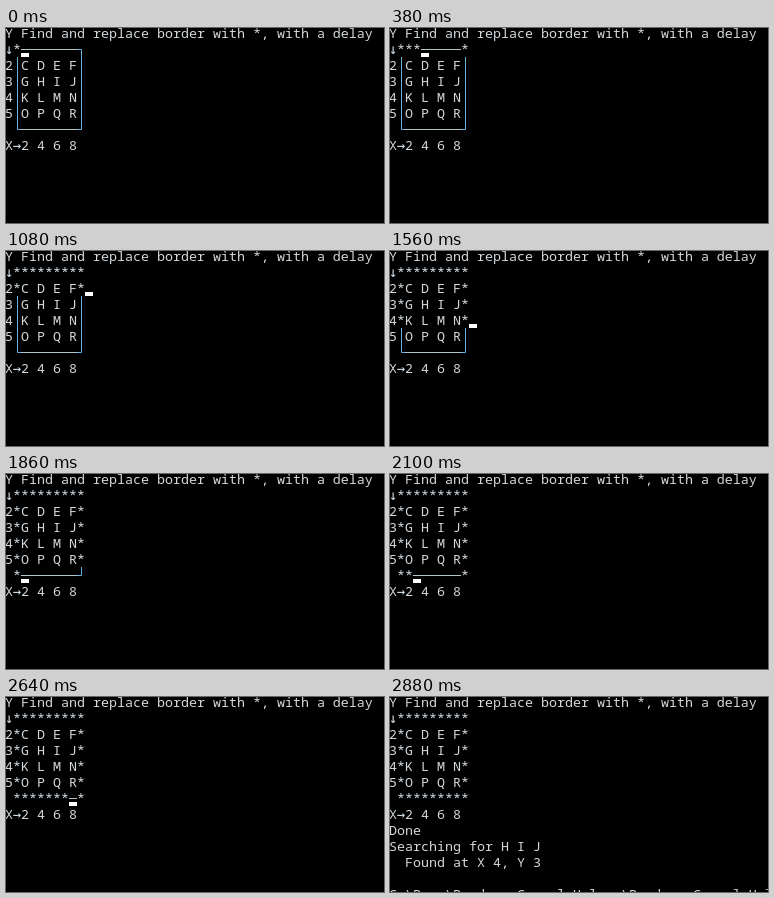
Recreate the animation shown at these times as an HTML page. Size 378 px wide and 195 px high, loop 4430 ms.

```html
<!DOCTYPE html>
<html lang="en">
<head>
<meta charset="utf-8">
<title>Border replace</title>
<style>
  html, body { margin: 0; width: 100%; height: 100%; overflow: hidden; background: #000; }
  svg { display: block; width: 100vw; height: 100vh; }
  text { font: 13.333px "Noto Sans Mono", "DejaVu Sans Mono", monospace; fill: #d2d8dc; white-space: pre; }
  .star { font-size: 13px; fill: #d6e0e8; text-anchor: middle; }
  .arrow { font: 14px "DejaVu Sans Mono", monospace; fill: #d6e4ee; text-anchor: middle; }
  .line { fill: none; stroke: #69b2e0; }
  .flat { fill: none; stroke: #b4c2ca; }
</style>
</head>
<body>
<svg id="stage" viewBox="0 0 378 195"></svg>
<script>
const LOOP = 4430, LEFT = 1, RIGHT = 9, TOP = 1, BOTTOM = 6;
const stage = document.getElementById('stage');
const cellX = col => col * 8 - 1;
const cellY = row => row * 16 - 3;

function add(tag, attrs, content = '') {
  const el = document.createElementNS('http://www.w3.org/2000/svg', tag);
  for (const key in attrs) el.setAttribute(key, attrs[key]);
  el.textContent = content;
  return stage.appendChild(el);
}
const show = (el, on) => el.setAttribute('visibility', on ? 'visible' : 'hidden');
const write = (row, str, col = 0) => add('text', { x: cellX(col), y: cellY(row) + 13 }, str);
const glyph = (row, col, char, name) =>
  add('text', { x: cellX(col) + 4, y: cellY(row) + 13, class: name }, char);

write(0, 'Y Find and replace border with *, with a delay');
glyph(1, 0, '↓', 'arrow');
['C D E F', 'G H I J', 'K L M N', 'O P Q R'].forEach((str, i) => {
  write(i + 2, String(i + 2));
  write(i + 2, str, 2);
});
write(7, 'X');
glyph(7, 1, '→', 'arrow');
write(7, '2 4 6 8', 2);

const output = [
  [2800, write(8, 'Done')],
  [2880, write(9, 'Searching for H I J')],
  [2880, write(10, '  Found at X 4, Y 3')],
  [2880, write(12, 'C:\\Bugs\\Borders Consol Helper\\Borders Consol Helper')]
];

// Each step: time, column, row. A step without a column hides the cursor.
const steps = [[0, LEFT, TOP], [140, RIGHT, TOP]];
const fill = (row, times) => times.forEach((time, i) => steps.push([time, i + 2, row]));
fill(TOP, [220, 380, 460, 540, 680, 760, 860]);
steps.push(
  [930, LEFT, 2], [1000], [1080, RIGHT, 2],
  [1160, LEFT, 3], [1320, RIGHT, 3],
  [1400, LEFT, 4], [1480], [1560, RIGHT, 4],
  [1620, LEFT, 5], [1700], [1780, RIGHT, 5],
  [1860, LEFT, BOTTOM], [1940], [2020, RIGHT, BOTTOM]
);
fill(BOTTOM, [2100, 2180, 2260, 2420, 2480, 2640, 2720]);

function borderPath(col, row) {
  const x = cellX(col), y = cellY(row), cx = x + 4.5, cy = y + 8.5;
  const side = col === LEFT || col === RIGHT;
  if (!side) return `M${x} ${cy}h8`;
  if (row !== TOP && row !== BOTTOM) return `M${cx} ${y}v16`;
  return `M${col === LEFT ? x + 8 : x} ${cy}H${cx}V${row === TOP ? y + 16 : y}`;
}

const cells = steps.filter(step => step.length > 1).map(([time, col, row]) => ({
  time,
  line: add('path', {
    d: borderPath(col, row),
    class: col === LEFT || col === RIGHT ? 'line' : 'flat'
  }),
  star: glyph(row, col, '*', 'star')
}));
const cursor = add('rect', { width: 8, height: 4, fill: '#fff' });

function render(t) {
  for (const { time, line, star } of cells) {
    show(line, t < time);
    show(star, t >= time);
  }
  for (const [time, el] of output) show(el, t >= time);

  let [, col, row] = steps.filter(step => step[0] <= t).pop();
  if (t >= 2800) [col, row] = [-1, 9];
  show(cursor, col !== undefined && t < 2880);
  if (col !== undefined) {
    cursor.setAttribute('x', cellX(col + 1));
    cursor.setAttribute('y', cellY(row) + 12);
  }
}

const start = performance.now();
function tick() {
  render((performance.now() - start) % LOOP);
  requestAnimationFrame(tick);
}
render(0);
requestAnimationFrame(tick);
</script>
</body>
</html>
```
